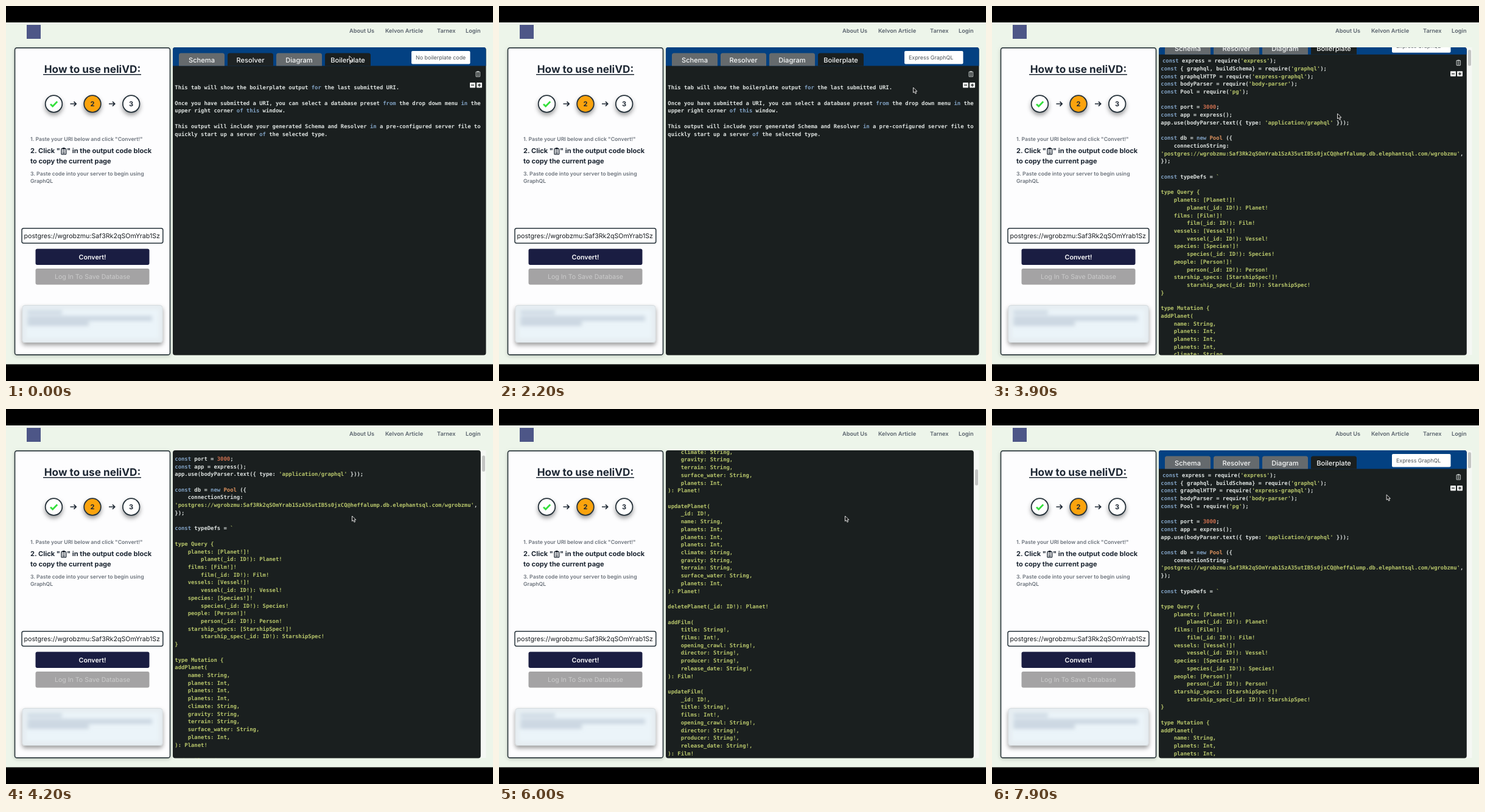
Write an HTML page that moves like this. It is 800x617 px and loops after 8 s.

```html
<!DOCTYPE html>
<html lang="en">
<head>
<meta charset="utf-8">
<title>Boilerplate tab</title>
<style>
html, body { margin: 0; width: 100%; height: 100%; overflow: hidden; background: #000; }
svg { display: block; width: 100vw; height: 100vh; }
text { font-family: Inter, Roboto, sans-serif; text-rendering: geometricPrecision; white-space: pre; }
.mid { text-anchor: middle; }
.nav { font-size: 9.2px; font-weight: 600; fill: #59626c; }
.note { font-size: 8.7px; font-weight: 600; fill: #6c737c; }
.step { font-size: 11.1px; font-weight: 650; fill: #1d2733; }
.tab { font-size: 11.1px; font-weight: 500; fill: #f4f6f6; text-anchor: middle; }
.code text { font: bold 8.9px "DejaVu Sans Mono", monospace; fill: #dde2e0; }
.code .kw { fill: #81a2c4; }
.code .str { fill: #b8c66b; }
.code .num { fill: #d0704f; }
.code .cls { fill: #de935f; }
</style>
</head>
<body>
<svg viewBox="0 0 800 617" preserveAspectRatio="none">
  <defs>
    <clipPath id="view"><rect id="viewBox" x="274" y="68" width="514.5" height="506.500" rx="4"/></clipPath>
    <clipPath id="field"><rect x="27" y="366" width="227.500" height="24"/></clipPath>
    <filter id="soft" x="-20%" y="-50%" width="140%" height="200%"><feGaussianBlur stdDeviation="3"/></filter>
    <filter id="drop" x="-30%" y="-30%" width="160%" height="180%">
      <feDropShadow dx="0" dy="4" stdDeviation="3.500" flood-color="#000" flood-opacity=".38"/>
    </filter>
    <g id="clip">
      <rect x="-3.200" y="-3.700" width="6.400" height="8" rx=".8" fill="none" stroke="currentColor" stroke-width="1.100"/>
      <rect x="-1.700" y="-4.900" width="3.400" height="2.300" rx=".5" fill="currentColor"/>
      <path d="M-1.700 -1H1.700M-1.700 .8H1.700M-1.700 2.600H1.700" stroke="currentColor" stroke-width=".9"/>
    </g>
    <path id="arrow" d="M0 0H9.500M6 -3.600L9.700 0L6 3.600" fill="none" stroke="#1d2733" stroke-width="1.700"/>
  </defs>

  <rect width="800" height="617" fill="#000"/>
  <rect y="27" width="800" height="562.500" fill="#edf5ea"/>
  <rect x="34" y="31" width="23" height="23" fill="#4d5687"/>
  <g class="nav">
    <text x="564" y="44">About Us</text>
    <text x="623" y="44">Kelvon Article</text>
    <text x="708" y="44">Tarnex</text>
    <text x="755" y="44">Login</text>
  </g>

  <rect x="14" y="70" width="256" height="506" rx="4" fill="#bcc6bb" filter="url(#soft)"/>
  <rect x="14.500" y="68.900" width="255" height="505" rx="3.500" fill="#fdfdfe" stroke="#303c40" stroke-width="1.700"/>
  <text class="mid" x="142" y="110.300" font-size="17.200" font-weight="700" fill="#1d2733">How to use neliVD:</text>
  <path d="M61 112.800H222" stroke="#1d2733" stroke-width="1.400"/>

  <g filter="url(#drop)" stroke="#26323a" stroke-width="1.800">
    <circle cx="78.500" cy="161" r="13.800" fill="#fff"/>
    <circle cx="142" cy="161" r="13.800" fill="#fba30d"/>
    <circle cx="205.700" cy="161" r="13.800" fill="#fff"/>
  </g>
  <path d="M73 161.500L76.700 165L84.200 157.300" fill="none" stroke="#35e03c" stroke-width="2.800"/>
  <use href="#arrow" x="105.500" y="161"/>
  <use href="#arrow" x="169" y="161"/>
  <g class="step mid">
    <text x="142" y="165">2</text>
    <text x="205.700" y="165">3</text>
  </g>

  <text class="note" x="40" y="221.500">1. Paste your URI below and click "Convert!"</text>
  <g class="step">
    <text x="40" y="242">2. Click "</text>
    <text x="100" y="242">" in the output code block</text>
    <text x="40" y="259">to copy the current page</text>
  </g>
  <use href="#clip" transform="translate(94.800 239) scale(1.200)" color="#1d2733"/>
  <text class="note" x="40" y="278.500">3. Paste code into your server to begin using</text>
  <text class="note" x="40" y="291">GraphQL</text>

  <rect x="26" y="365.700" width="231.800" height="24.500" rx="3" fill="#fff" stroke="#26323a" stroke-width="1.500"/>
  <text x="29.500" y="382" font-size="10.650" fill="#15191d" clip-path="url(#field)" id="uri"></text>
  <rect x="48.500" y="399.500" width="187" height="26.500" rx="3" fill="#1a1d42"/>
  <text class="mid" x="142" y="416.800" font-size="10.700" font-weight="600" fill="#fff">Convert!</text>
  <rect x="48.500" y="432" width="187" height="26.500" rx="3" fill="#a4a3a4"/>
  <text class="mid" x="142" y="449" font-size="10.600" fill="#cbcbcb">Log In To Save Database</text>

  <rect x="27" y="492.500" width="230" height="61" rx="4" fill="#e6edf1" stroke="#d5dbde" filter="url(#drop)"/>
  <rect x="33" y="499" width="218" height="48" fill="#ebf4f9" filter="url(#soft)"/>
  <g filter="url(#soft)" fill="#b4c1d0">
    <rect x="35" y="501" width="57" height="6" opacity=".6"/>
    <rect x="35" y="510" width="205" height="8" opacity=".6"/>
    <rect x="35" y="519" width="101" height="7" opacity=".65"/>
  </g>

  <rect id="track" x="779" y="68" width="9.500" height="506" fill="#f5f8f4"/>
  <rect id="thumb" x="782" y="71" width="5" height="26.500" rx="2.500" fill="#c3c5c3"/>
  <g clip-path="url(#view)">
    <rect x="274" y="68" width="516" height="508" fill="#1a1f1f"/>
    <g id="page">
      <rect x="274" y="68" width="516" height="30.500" fill="#034182"/>
      <g id="tabs"></g>
      <g id="tools">
        <rect x="666" y="74" width="96.500" height="21.500" rx="2" fill="#fff"/>
        <text id="pick" x="673" y="88" font-size="8.900" fill="#4b5358"></text>
        <use href="#clip" x="775.300" y="112" color="#b9bebd"/>
        <rect x="762" y="126" width="9" height="8.500" rx="1" fill="#f2f4f3"/>
        <rect x="773" y="126" width="9" height="8.500" rx="1" fill="#f2f4f3"/>
        <path d="M764 130.200H769M775 130.200H780M777.500 127.700V132.700" stroke="#1a1f1f" stroke-width="1.300"/>
      </g>
      <g id="intro" class="code"></g>
      <g id="source" class="code"></g>
    </g>
  </g>
  <path id="cursor" d="M0 0V8.600L2 6.900L3.500 10.200L5.100 9.500L3.700 6.300H6.300Z" fill="#111" stroke="#f4f4f4" stroke-width=".9"/>
</svg>
<script>
const NS = 'http://www.w3.org/2000/svg';
const $ = id => document.getElementById(id);
const LOOP = 8000, LINE = 12.72;
const USER = 'wgrobzmu', PASS = 'Saf3Rk2qSOmYrab1Sz';
const uri = `postgres://${USER}:${PASS}`;

function add(parent, tag, attrs, text) {
  const el = document.createElementNS(NS, tag);
  for (const k in attrs) el.setAttribute(k, attrs[k]);
  if (text !== undefined) el.textContent = text;
  parent.appendChild(el);
  return el;
}

// --- text blocks ---
const intro = `

This tab will show the boilerplate output for the last submitted URI.

Once you have submitted a URI, you can select a database preset from the drop down menu in the
upper right corner of this window.

This output will include your generated Schema and Resolver in a pre-configured server file to
quickly start up a server of the selected type.`.split('\n');

const head = `const express = require('express');
const { graphql, buildSchema} = require('graphql');
const graphqlHTTP = require('express-graphql');
const bodyParser = require('body-parser');
const Pool = require('pg');

const port = 3000;
const app = express();
app.use(bodyParser.text({ type: 'application/graphql' }));

const db = new Pool ({
    connectionString:
'${uri}A35utIB5s0jxCQ@heffalump.db.elephantsql.com/${USER}',
});

const typeDefs = \``.split('\n');

const queries = ['planets planet Planet', 'films film Film', 'vessels vessel Vessel',
  'species species Species', 'people person Person', 'starship_specs starship_spec StarshipSpec'];
const planet = ['name: String', ...Array(3).fill('planets: Int'), 'climate: String', 'gravity: String',
  'terrain: String', 'surface_water: String', 'planets: Int'];
const film = ['title: String!', 'films: Int!', 'opening_crawl: String!', 'director: String!',
  'producer: String!', 'release_date: String!'];
const mutation = (name, type, args) => [name + type + '(', ...args.map(a => `    ${a},`), `): ${type}!`, ''];

const schema = ['', 'type Query {',
  ...queries.flatMap(q => {
    const [many, one, type] = q.split(' ');
    return [`    ${many}: [${type}!]!`, `        ${one}(_id: ID!): ${type}!`];
  }),
  '}', '', 'type Mutation {',
  ...mutation('add', 'Planet', planet),
  ...mutation('update', 'Planet', ['_id: ID!', ...planet]),
  'deletePlanet(_id: ID!): Planet!', '',
  ...mutation('add', 'Film', film),
  ...mutation('update', 'Film', ['_id: ID!', ...film])];

const kind = s => /^['`]/.test(s) ? 'str' : /^\d/.test(s) ? 'num' : s === 'Pool' ? 'cls' : 'kw';

// Splitting on one capture group puts the marked words at odd places.
function write(group, lines, first, pattern) {
  lines.forEach((line, i) => {
    if (!line) return;
    const n = first + i;
    const x = group.id === 'source' && n === 0 ? 280 : 277.3;
    const t = add(group, 'text', { x, y: 111.8 + n * LINE });
    if (!pattern) {
      add(t, 'tspan', { class: 'str' }, line);
      return;
    }
    line.split(pattern).forEach((part, k) => {
      if (part) add(t, 'tspan', k % 2 ? { class: kind(part) } : {}, part);
    });
  });
}
write($('intro'), intro, 0, /(\b(?:for|from|in|of|this)\b)/);
write($('source'), head, 0, /('[^']*'|`|\b(?:const|new)\b|\b3000\b|Pool(?= \())/);
write($('source'), schema, head.length);
$('uri').textContent = uri;

const tabs = ['Schema', 'Resolver', 'Diagram', 'Boilerplate'].map((name, i) => {
  const x = 284 + i * 80;
  const d = `M${x} 98.500V81q0-3.500 3.500-3.500H${x + 71.5}q3.500 0 3.500 3.500V98.500Z`;
  const tab = add($('tabs'), 'path', { d, fill: i === 3 ? '#1a1f1f' : '#656a6d' });
  add($('tabs'), 'text', { class: 'tab', x: x + 37.5, y: 92.7 }, name);
  return tab;
});

// --- motion: [time, values...] ---
const scrollKeys = [[3750, 0], [3900, 18.5], [4300, 135], [4900, 327], [5250, 455], [5600, 521.5],
  [6050, 521.5], [6300, 260], [6600, 0]];
const cursorKeys = [[0, 564, 82], [150, 566, 82], [850, 703, 82], [1300, 703, 84], [1600, 697, 99],
  [2200, 680.5, 134], [2700, 672, 143], [3500, 567.5, 177], [3900, 567.5, 177], [4100, 568.5, 176],
  [7350, 568.5, 176], [7900, 648, 141], [8000, 661, 135]];

// Monotone cubic interpolation, so holds stay still.
function track(keys, t, c) {
  if (t <= keys[0][0]) return keys[0][c];
  const last = keys.length - 1;
  if (t >= keys[last][0]) return keys[last][c];
  let i = 0;
  while (t > keys[i + 1][0]) i++;
  const slope = k => (keys[k + 1][c] - keys[k][c]) / (keys[k + 1][0] - keys[k][0]);
  const tangent = k => {
    if (k === 0 || k === last) return 0;
    const a = slope(k - 1), b = slope(k);
    return a * b <= 0 ? 0 : 2 * a * b / (a + b);
  };
  const [p, q] = [keys[i], keys[i + 1]];
  const h = q[0] - p[0], u = (t - p[0]) / h, v = 1 - u;
  return p[c] * (1 + 2 * u) * v * v + tangent(i) * h * u * v * v
    + q[c] * u * u * (3 - 2 * u) - tangent(i + 1) * h * u * u * v;
}

const show = (id, on) => $(id).setAttribute('visibility', on ? 'visible' : 'hidden');

function render(t) {
  const loaded = t >= 2800;
  const scroll = track(scrollKeys, t, 1);
  show('intro', !loaded);
  show('source', loaded);
  show('track', loaded);
  show('thumb', loaded);
  $('viewBox').setAttribute('width', loaded ? 505.8 : 514.5);
  $('tools').setAttribute('transform', `translate(${loaded ? -9 : 0} 0)`);
  $('page').setAttribute('transform', `translate(0 ${-scroll})`);
  $('thumb').setAttribute('y', 71 + scroll * 0.054);
  $('pick').textContent = t < 1650 ? 'No boilerplate code' : 'Express GraphQL';
  const fade = Math.min(1, Math.max(0, (t - 100) / 200));
  const mix = (a, b) => Math.round(a + (b - a) * fade);
  tabs[1].setAttribute('fill', `rgb(${mix(30, 101)},${mix(35, 106)},${mix(36, 109)})`);
  $('cursor').setAttribute('transform', `translate(${track(cursorKeys, t, 1)} ${track(cursorKeys, t, 2)})`);
}

const start = performance.now();
function tick() {
  render((performance.now() - start) % LOOP);
  requestAnimationFrame(tick);
}
tick();
</script>
</body>
</html>
```
